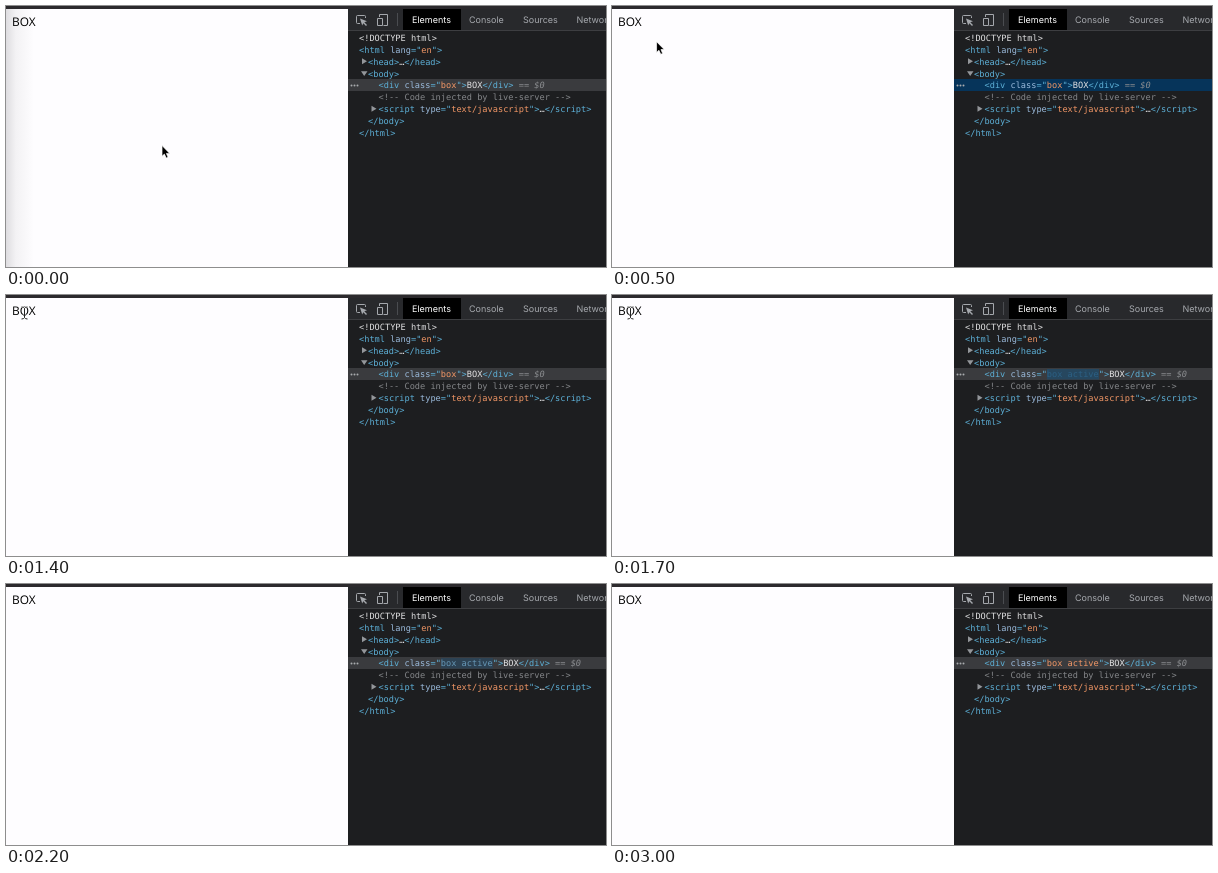
These frames come from a looping animation (600x261 px, 3200 ms). An HTML page:

```html
<!DOCTYPE html>
<html lang="en">
<head>
<meta charset="utf-8">
<title>Class toggle in the element inspector</title>
<style>
  html, body { margin: 0; width: 100%; height: 100%; overflow: hidden; background: #fefdff; }
  svg { display: block; width: 100%; height: 100%; }
  text { white-space: pre; text-rendering: geometricPrecision; }
  .code { font: 8.65px "DejaVu Sans Mono", monospace; fill: #e2e2e3; }
  .tab { font: 9px Inter, sans-serif; fill: #a5a8ad; }
  .tag { fill: #5db0d7; }
  .attr { fill: #9bbbdc; }
  .val { fill: #f29766; }
  .note { fill: #85878a; }
  .self { fill: #8b8d90; font-style: italic; }
  .fold { fill: #93969a; }
  .icon { fill: none; stroke: #a5a8ad; stroke-width: 1; }
</style>
</head>
<body>
<svg viewBox="0 0 600 261">
  <defs>
    <linearGradient id="edge">
      <stop offset="0" stop-color="#dedde0"/>
      <stop offset=".35" stop-color="#f3f2f4"/>
      <stop offset="1" stop-color="#fefdff"/>
    </linearGradient>
  </defs>
  <rect width="600" height="261" fill="#fefdff"/>
  <rect id="shade" y="3" width="28" height="258" fill="url(#edge)"/>
  <text x="6" y="20" font-family="'Open Sans', sans-serif" font-size="11.9">BOX</text>

  <rect x="342" width="258" height="261" fill="#1d1e20"/>
  <rect x="342" y="3" width="258" height="21" fill="#28292c"/>
  <rect x="342" y="24" width="258" height="1" fill="#3d3e41"/>
  <rect x="397" y="3" width="58" height="21" fill="#000"/>
  <rect width="600" height="3" fill="#2c2a2d"/>
  <path class="icon" d="M354 17.5H351.500Q350.500 17.500 350.500 16.500V10.500Q350.500 9.500 351.500 9.500H358.500Q359.500 9.500 359.500 10.500V12"/>
  <path d="M354 12.500L361 15.200L358.300 16.300L361 19L360 20L357.300 17.300L356.200 19.500Z" fill="#a5a8ad"/>
  <path class="icon" d="M373.500 11V8.500H381.500V19.500H377.500M371.500 12.500H376.500V19.500H371.500Z"/>
  <path d="M391.500 7V20" stroke="#4a4c50"/>
  <g class="tab">
    <text x="406" y="17" fill="#fff" style="fill:#fff">Elements</text>
    <text x="463" y="17">Console</text>
    <text x="517" y="17">Sources</text>
    <text x="570.500" y="17">Network</text>
  </g>

  <rect id="row" x="342" y="73" width="258" height="12"/>
  <rect id="flash" x="435" y="74" width="52" height="10.500"/>
  <g fill="#a9abae">
    <circle cx="345.500" cy="79.500" r="1"/>
    <circle cx="348.500" cy="79.500" r="1"/>
    <circle cx="351.500" cy="79.500" r="1"/>
  </g>
  <path class="fold" d="M356 52.300L361 55.300L356 58.300ZM355 65.300H361.500L358.200 70ZM365.500 99.800L370.500 102.800L365.500 105.800Z"/>
  <g class="code">
    <text x="353" y="35">&lt;!DOCTYPE html&gt;</text>
    <text x="353" y="47" class="tag">&lt;html <tspan class="attr">lang</tspan>="<tspan class="val">en</tspan>"&gt;</text>
    <text x="362" y="58.700" class="tag">&lt;head&gt;<tspan fill="#e2e2e3">…</tspan>&lt;/head&gt;</text>
    <text x="362" y="70.500" class="tag">&lt;body&gt;</text>
    <text x="372.500" y="82.300" class="tag">&lt;div <tspan class="attr">class</tspan>="<tspan id="names"></tspan>"&gt;<tspan fill="#e2e2e3">BOX</tspan>&lt;/div&gt;<tspan class="self"> == $0</tspan></text>
    <text x="372.500" y="94.200" class="note">&lt;!-- Code injected by live-server --&gt;</text>
    <text x="372.500" y="106" class="tag">&lt;script <tspan class="attr">type</tspan>="<tspan class="val">text/javascript</tspan>"&gt;<tspan fill="#e2e2e3">…</tspan>&lt;/script&gt;</text>
    <text x="362" y="117.900" class="tag">&lt;/body&gt;</text>
    <text x="353" y="129.700" class="tag">&lt;/html&gt;</text>
  </g>

  <path id="arrow" d="M0 0V10.800L2.400 8.600L4.200 12.600L6.100 11.800L4.400 7.900H7.700Z" fill="#000" stroke="#fff" stroke-width=".7"/>
  <g id="beam" fill="none">
    <path d="M-3 -6Q-.5 -6 0 -4.500Q.5 -6 3 -6M0 -4.500V4.500M-3 6Q-.5 6 0 4.500Q.5 6 3 6M-1.500 2H1.500" stroke="#fff" stroke-width="2.200"/>
    <path d="M-3 -6Q-.5 -6 0 -4.500Q.5 -6 3 -6M0 -4.500V4.500M-3 6Q-.5 6 0 4.500Q.5 6 3 6M-1.500 2H1.500" stroke="#222" stroke-width="1"/>
  </g>
</svg>
<script>
  const LOOP = 3200, STEP = 100;
  const $ = id => document.getElementById(id);
  const [shade, row, flash, names, arrow, beam] =
    ["shade", "row", "flash", "names", "arrow", "beam"].map($);

  const ramp = (t, a, b) => Math.min(1, Math.max(0, (t - a) / (b - a)));
  const smooth = p => p * p * (3 - 2 * p);
  const lerp = (a, b, p) => a + (b - a) * p;
  const mix = (a, b, p) => `rgb(${a.map((v, i) => Math.round(lerp(v, b[i], p)))})`;
  const show = (el, on) => el.setAttribute("display", on ? "inline" : "none");
  const move = (el, x, y) => el.setAttribute("transform", `translate(${x} ${y})`);

  const ORANGE = [242, 151, 102], DEEP = [44, 96, 132], PALE = [159, 205, 232];
  const GREY = [58, 59, 62], GLOW = [36, 72, 98];

  function draw(time) {
    const t = Math.floor(time / STEP) * STEP;
    const focused = t >= 100 && t < 1300;
    const active = t >= 1600;

    show(shade, t < 100);
    row.setAttribute("fill", focused ? "#06345a" : mix(GREY, GREY, 0));

    // Pointer glides to the word and becomes a text cursor.
    const p = smooth(ramp(t, 0, 700));
    move(arrow, lerp(156, 17, p), lerp(139.500, 10, p));
    show(arrow, t < 700);
    const settled = t >= 1300;
    move(beam, settled ? 18.500 : lerp(22, 19.500, ramp(t, 700, 900)), settled ? 18 : 17);
    show(beam, t >= 700 && t < 2200);

    // Changed attribute lights up, then fades back to its own colour.
    names.textContent = active ? "box active" : "box";
    show(flash, active && t < 3000);
    flash.setAttribute("fill", mix(GLOW, GREY, ramp(t, 1600, 3000)));
    const ink = t < 2600
      ? mix(DEEP, PALE, ramp(t, 1800, 2600))
      : mix(PALE, ORANGE, ramp(t, 2600, 3000));
    names.setAttribute("fill", active ? ink : mix(ORANGE, ORANGE, 0));
  }

  const start = performance.now();
  function tick() {
    draw((performance.now() - start) % LOOP);
    requestAnimationFrame(tick);
  }
  tick();
</script>
</body>
</html>
```
